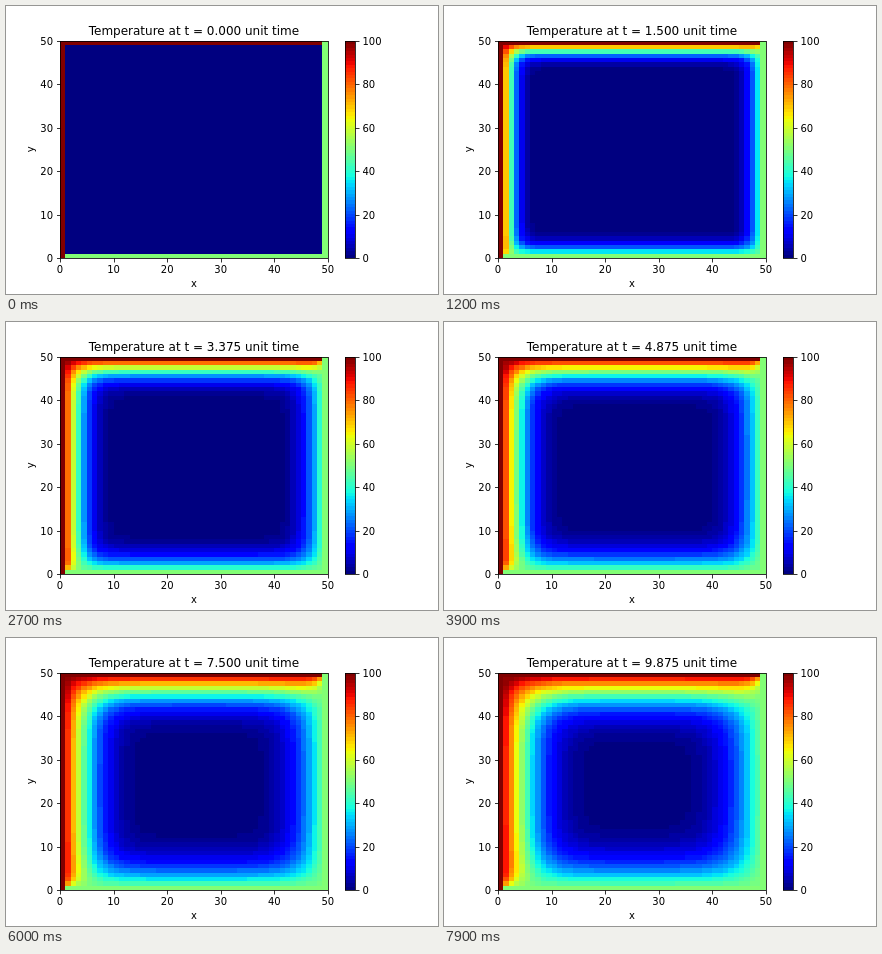
These frames come from a looping animation (432x288 px, 8 s). An HTML page with a canvas:

```html
<!DOCTYPE html>
<html lang="en">
<head>
<meta charset="utf-8">
<title>Heat equation</title>
<style>
  html, body { margin: 0; width: 100%; height: 100%; overflow: hidden; background: #fff; }
  canvas { display: block; width: 432px; height: 288px; }
</style>
</head>
<body>
<canvas id="plot" width="432" height="288"></canvas>
<script>
const ctx = document.getElementById('plot').getContext('2d');
const FONT = '"DejaVu Sans", sans-serif';
const N = 50, STEPS = 80, STEP_MS = 100, DT = 0.125, GAMMA = 0.25;
const LEFT = 54, RIGHT = 321.84, TOP = 34.56, BOTTOM = 252;
const BAR_LEFT = 338.58, BAR_RIGHT = 349.45;
const LEVELS = 64;

// Piecewise linear channels of the "jet" colour map
const JET = [
  [[0, 0], [0.35, 0], [0.66, 1], [0.89, 1], [1, 0.5]],
  [[0, 0], [0.125, 0], [0.375, 1], [0.64, 1], [0.91, 0], [1, 0]],
  [[0, 0.5], [0.11, 1], [0.34, 1], [0.65, 0], [1, 0]]
];

function ramp(points, v) {
  let i = 1;
  while (i < points.length - 1 && v > points[i][0]) i++;
  const [x0, y0] = points[i - 1], [x1, y1] = points[i];
  return y0 + (y1 - y0) * (v - x0) / (x1 - x0);
}

const palette = Array.from({ length: LEVELS }, (_, i) =>
  `rgb(${JET.map(c => Math.round(255 * ramp(c, i / (LEVELS - 1)))).join(',')})`);

const color = temp => palette[Math.min(LEVELS - 1, Math.floor(temp / 100 * LEVELS))];

// Row 0 is the bottom edge of the plate
function firstPlate() {
  return Array.from({ length: N }, (_, y) => Array.from({ length: N }, (_, x) => {
    if (x === N - 1) return 50;
    if (x === 0 || y === N - 1) return 100;
    return y === 0 ? 50 : 0;
  }));
}

function diffuse(u) {
  return u.map((row, y) => row.map((v, x) => {
    if (x === 0 || y === 0 || x === N - 1 || y === N - 1) return v;
    return v + GAMMA * (u[y + 1][x] + u[y - 1][x] + row[x + 1] + row[x - 1] - 4 * v);
  }));
}

const plates = [firstPlate()];
while (plates.length < STEPS) plates.push(diffuse(plates[plates.length - 1]));

const edgeX = i => Math.round(LEFT + (RIGHT - LEFT) * i / N);
const edgeY = i => Math.round(BOTTOM - (BOTTOM - TOP) * i / N);

function drawPlate(u) {
  for (let y = 0; y < N; y++) {
    const top = edgeY(y + 1), h = edgeY(y) - top;
    for (let x = 0; x < N; x++) {
      const left = edgeX(x);
      ctx.fillStyle = color(u[y][x]);
      ctx.fillRect(left, top, edgeX(x + 1) - left, h);
    }
  }
}

function drawBar() {
  const x = Math.round(BAR_LEFT), w = Math.round(BAR_RIGHT) - x;
  const top = Math.round(TOP);
  for (let y = top; y < BOTTOM; y++) {
    ctx.fillStyle = color(100 * (BOTTOM - y - 0.5) / (BOTTOM - top));
    ctx.fillRect(x, y, w, 1);
  }
}

const snap = v => Math.floor(v + 0.5) + 0.5;

function line(x0, y0, x1, y1) {
  ctx.beginPath();
  ctx.moveTo(x0, y0);
  ctx.lineTo(x1, y1);
  ctx.stroke();
}

function frameBox(x0, x1) {
  const x = snap(x0), y = snap(TOP);
  ctx.strokeRect(x, y, snap(x1) - x, snap(BOTTOM) - y);
}

function label(text, x, y, align, size = 10) {
  ctx.font = `${size}px ${FONT}`;
  ctx.textAlign = align;
  ctx.fillText(text, x, y);
}

function drawAxes() {
  ctx.strokeStyle = ctx.fillStyle = '#000';
  ctx.lineWidth = 0.8;
  frameBox(LEFT, RIGHT);
  frameBox(BAR_LEFT, BAR_RIGHT);
  for (let i = 0; i <= 5; i++) {
    const x = LEFT + (RIGHT - LEFT) * i / 5;
    const y = BOTTOM - (BOTTOM - TOP) * i / 5;
    const sx = snap(x), sy = snap(y);
    line(sx, 252.5, sx, 256.5);
    line(51, sy, 54.5, sy);
    line(349.5, sy, 353.5, sy);
    label(i * 10, x, 267, 'center');
    label(i * 10, 47, Math.round(y + 4), 'right');
    label(i * 20, 356.5, Math.round(y + 4), 'left');
  }
  const midX = (LEFT + RIGHT) / 2;
  label('x', midX, 281, 'center');
  ctx.save();
  ctx.translate(28, (TOP + BOTTOM) / 2);
  ctx.rotate(-Math.PI / 2);
  label('y', 0, 0, 'center');
  ctx.restore();
}

function draw(step) {
  ctx.fillStyle = '#fff';
  ctx.fillRect(0, 0, 432, 288);
  drawPlate(plates[step]);
  drawBar();
  drawAxes();
  const time = (step * DT).toFixed(3);
  label(`Temperature at t = ${time} unit time`, (LEFT + RIGHT) / 2, 29, 'center', 12);
}

let shown = -1;
function tick() {
  const step = Math.floor(performance.now() / STEP_MS) % STEPS;
  if (step !== shown) draw(shown = step);
  requestAnimationFrame(tick);
}
tick();
</script>
</body>
</html>
```
